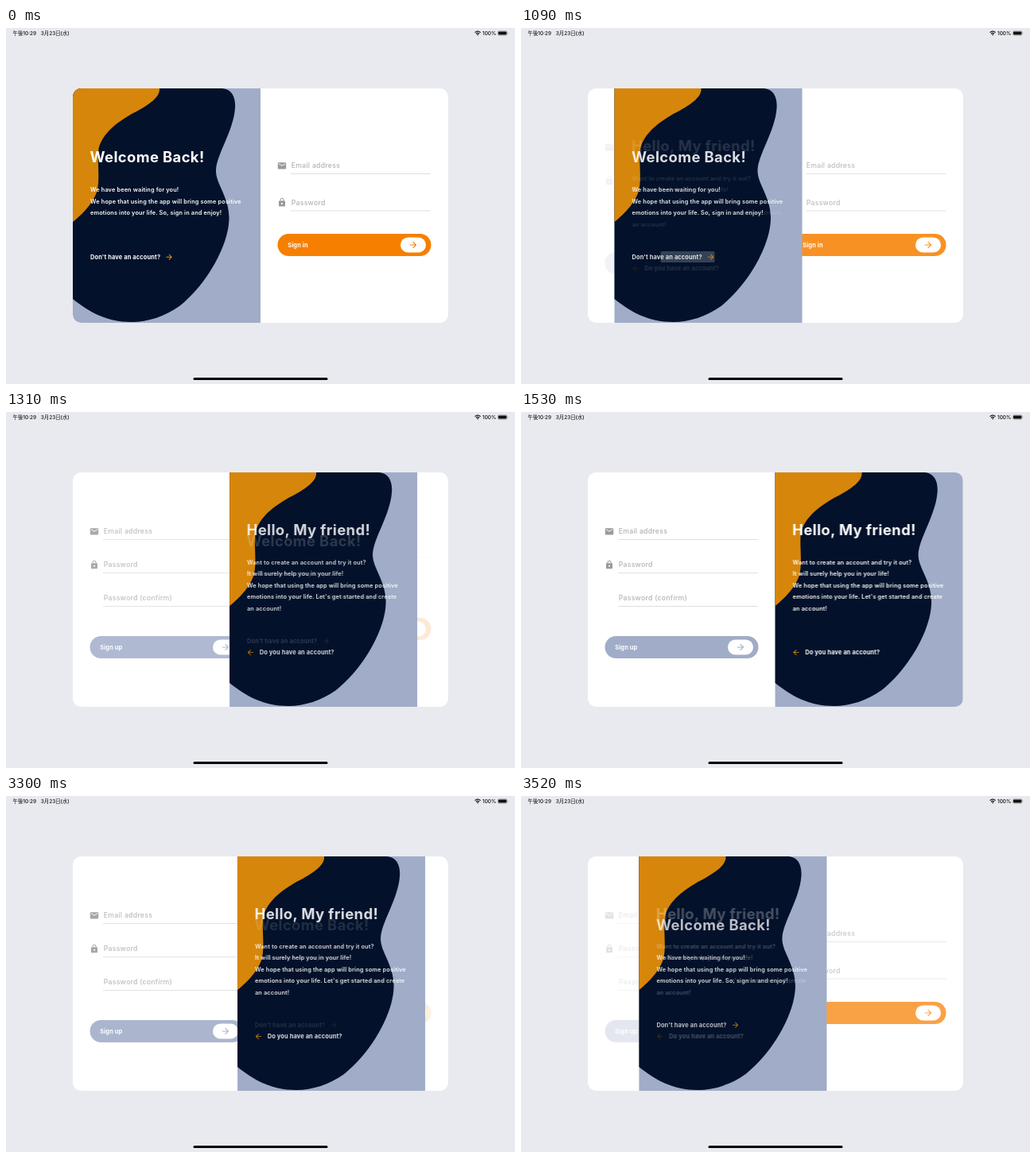
These frames come from a looping animation (640x448 px, 3.63 s). An HTML page:

```html
<!DOCTYPE html>
<html lang="en">
<head>
<meta charset="utf-8">
<title>Sign in / sign up panel</title>
<style>
  html, body { margin: 0; width: 100%; height: 100%; overflow: hidden; background: #e9eaef; }
  svg { display: block; width: 640px; height: 448px; font-family: Inter, "Noto Sans", sans-serif; }
  .status { font: 500 6.4px Inter, "Noto Sans CJK JP", "Noto Sans CJK", sans-serif; fill: #111; }
  .title { font-size: 18.4px; font-weight: 700; letter-spacing: .4px; fill: #fff; }
  .body { font-size: 7.3px; font-weight: 600; letter-spacing: .17px; fill: #fff; }
  .link { font-size: 7.4px; font-weight: 700; letter-spacing: .16px; fill: #fff; }
  .hint { font-size: 8.7px; font-weight: 500; letter-spacing: .27px; fill: #b2b2b2; }
  .icon { fill: #9a9a9a; }
  .rule { stroke: #d2d2d2; stroke-width: .7; }
</style>
</head>
<body>
<svg viewBox="0 0 640 448">
  <defs>
    <clipPath id="card"><rect x="84" y="76" width="472" height="295" rx="10.5"/></clipPath>
    <path id="mail" d="M20 4H4c-1.1 0-2 .9-2 2v12c0 1.1.9 2 2 2h16c1.1 0 2-.9 2-2V6c0-1.1-.9-2-2-2zm0 4l-8 5-8-5V6l8 5 8-5v2z"/>
    <path id="lock" d="M18 8h-1V6c0-2.76-2.24-5-5-5S7 3.24 7 6v2H6c-1.1 0-2 .9-2 2v10c0 1.1.9 2 2 2h12c1.1 0 2-.9 2-2V10c0-1.1-.9-2-2-2zm-6 9c-1.1 0-2-.9-2-2s.9-2 2-2 2 .9 2 2-.9 2-2 2zm3.1-9H8.9V6c0-1.71 1.39-3.1 3.1-3.1s3.1 1.39 3.1 3.1v2z"/>
    <path id="arrow" d="M12 4l-1.41 1.41L16.17 11H4v2h12.17l-5.58 5.59L12 20l8-8z"/>
  </defs>

  <rect width="640" height="448" fill="#e9eaef"/>

  <g class="status">
    <text x="8.6" y="8.7">午後10:29</text>
    <text x="43.8" y="8.7">3月23日(水)</text>
    <text x="599" y="8.7">100%</text>
    <g fill="none" stroke="#111" stroke-width="1.2">
      <path d="M589.5 5.6Q593.1 2.5 596.7 5.6M591 7.2Q593.1 5.4 595.2 7.2"/>
    </g>
    <path d="M591.9 8.2Q593.1 7.2 594.3 8.2L593.1 9.5Z"/>
    <rect x="618.3" y="3.8" width="11.8" height="5.4" rx="1.5" fill="none" stroke="#777" stroke-width=".5"/>
    <rect x="619" y="4.4" width="10.4" height="4.2" rx="1"/>
    <path d="M630.8 5.5q1 .9 0 2z" fill="#777"/>
  </g>

  <rect x="84" y="76" width="472" height="295" rx="10.5" fill="#fff"/>
  <g clip-path="url(#card)">
    <g id="signUp"></g>
    <g id="signIn"></g>
    <g id="panel">
      <rect y="76" width="236" height="295" fill="#a0acc8"/>
      <path fill="#03112a" d="M0 76H188C200 77 205 87 204 101C202 130 180 160 180 180C180 196 196 212 196.500 238C197 272 169 322 134 350C116 363 94 370 74 370C42 370 20 357 0 341Z"/>
      <path fill="#d6860a" d="M0 76H109C110 87 96 96 82 104C62 114 34 132 32 156C31 170 34 190 31 203C28 217 14 233 0 244Z"/>
      <rect id="ripple" height="14" rx="1.5" fill="#fff"/>
      <g id="welcome"></g>
      <g id="hello"></g>
    </g>
  </g>

  <rect x="235.500" y="440" width="169" height="3" rx="1.5" fill="#000"/>
</svg>
<script>
const LOOP = 3630, STEP = 110, TRAVEL = 236;
const $ = id => document.getElementById(id);

const text = (cls, x, y, s) => `<text class="${cls}" x="${x}" y="${y}">${s}</text>`;
const icon = (id, x, y, k, attrs) =>
  `<use href="#${id}" transform="translate(${x} ${y}) scale(${k}) translate(-12 -12)" ${attrs}/>`;

// One input: optional icon, hint and underline; y is the middle of the hint.
const field = (x, y, hint, sign, drop) =>
  (sign ? icon(sign, x + 5.5, y + .3, sign === 'mail' ? .52 : .5, 'class="icon"') : '') +
  text('hint', x + 17.2, y + 3.2, hint) +
  `<line class="rule" x1="${x + 16.500}" x2="${x + 192.500}" y1="${y + drop}" y2="${y + drop}"/>`;

const button = (x, y, label, color) =>
  `<rect x="${x}" y="${y}" width="193" height="28" rx="14" fill="${color}"/>` +
  `<rect x="${x + 154.500}" y="${y + 4.500}" width="32" height="19" rx="9.5" fill="#fff"/>` +
  icon('arrow', x + 170.500, y + 14, .54, `fill="${color}"`) +
  text('link', x + 12.700, y + 16.700, label);

const lines = (y, list) => list.map((s, i) => text('body', 22, y + i * 14.5, s)).join('');

$('signIn').innerHTML =
  field(341.5, 173, 'Email address', 'mail', 10.5) +
  field(341.5, 219.3, 'Password', 'lock', 10.700) +
  button(341.5, 259, 'Sign in', '#f77f00');

$('signUp').innerHTML =
  field(105.5, 150, 'Email address', 'mail', 10.5) +
  field(105.5, 192, 'Password', 'lock', 10.5) +
  field(105.5, 234, 'Password (confirm)', '', 10.5) +
  button(105.5, 282, 'Sign up', '#a0acc8');

$('welcome').innerHTML =
  text('title', 21.5, 169, 'Welcome Back!') +
  lines(206.3, ['We have been waiting for you!',
    'We hope that using the app will bring some positive',
    'emotions into your life. So, sign in and enjoy!']) +
  text('link', 22, 290.700, "Don't have an account?") +
  icon('arrow', 121.200, 288.3, .46, 'fill="#e8920c"');

$('hello').innerHTML =
  text('title', 21.5, 154.5, 'Hello, My friend!') +
  lines(191.800, ['Want to create an account and try it out?',
    'It will surely help you in your life!',
    'We hope that using the app will bring some positive',
    "emotions into your life. Let's get started and create",
    'an account!']) +
  icon('arrow', 26.3, 302.600, -.46, 'fill="#e8920c"') +
  text('link', 37.700, 305, 'Do you have an account?');

// cubic-bezier(.25, .1, .25, 1)
function ease(u) {
  if (u <= 0) return 0;
  if (u >= 1) return 1;
  let lo = 0, hi = 1, s;
  for (let i = 0; i < 24; i++) {
    s = (lo + hi) / 2;
    if (.75 * s * (1 - s) + s ** 3 < u) lo = s; else hi = s;
  }
  return .3 * s * (1 - s) ** 2 + 3 * s * s * (1 - s) + s ** 3;
}

// The motion advances in visible steps and rests between the two slides.
function hold(t) {
  if (t < 980) return 0;
  const start = t < 3080 ? 980 : 3080;
  const q = start + Math.floor((t - start) / STEP) * STEP;
  return t < 3080 ? Math.min(q, 1530) : q;
}

// Tap highlight on a link: [left, right, top, alpha]
function tap(t) {
  switch (t) {
    case 1090: return [58, 126, 281, .2];
    case 1200: return [31.5, 126, 281, .06];
    case 3080: return [22.5, 76, 296, .27];
    case 3190: return [22.5, 112, 296, .13];
  }
  return [0, 0, 0, 0];
}

function draw(time) {
  const t = hold(time);
  const p = t < 3080 ? ease((t - 1021) / 540) : Math.min(.9977, ease(1 - (t - 3073) / 552));
  const [left, right, top, alpha] = tap(t);
  const ripple = $('ripple');
  $('panel').setAttribute('transform', `translate(${84 + TRAVEL * p} 0)`);
  for (const id of ['signUp', 'hello']) $(id).setAttribute('opacity', p);
  for (const id of ['signIn', 'welcome']) $(id).setAttribute('opacity', 1 - p);
  ripple.setAttribute('x', left);
  ripple.setAttribute('y', top);
  ripple.setAttribute('width', right - left);
  ripple.setAttribute('opacity', alpha);
}

const begin = performance.now();
function tick() {
  draw((performance.now() - begin) % LOOP);
  requestAnimationFrame(tick);
}
tick();
</script>
</body>
</html>
```
